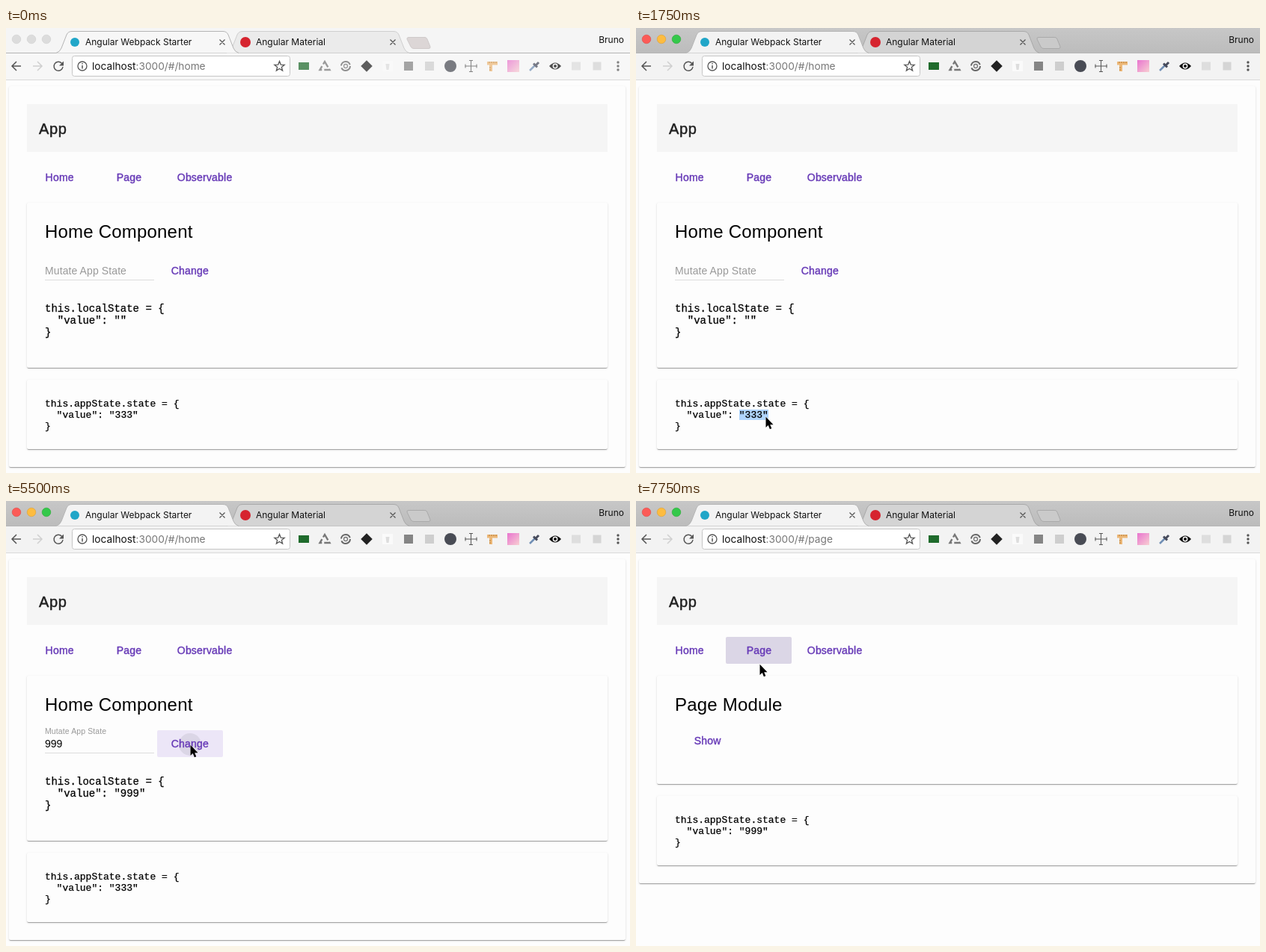
An HTML page for the animation above (8 s loop, 834 by 596 pixels).

```html
<!DOCTYPE html>
<html lang="en">
<head>
<meta charset="utf-8">
<title>App state demo</title>
<style>
  html, body { margin: 0; width: 100%; height: 100%; overflow: hidden; background: #fdfdfd; }
  .card { position: absolute; background: #fdfdfd; border-radius: 2px;
    box-shadow: 0 2px 1px -1px rgba(0,0,0,.2), 0 1px 1px rgba(0,0,0,.14), 0 1px 3px rgba(0,0,0,.12); }
  .inner { left: 28px; width: 776px; }
  svg { position: absolute; left: 0; top: 0; }
  text { white-space: pre; font-family: "Liberation Sans", Arial, sans-serif; }
  .ui { font: 12px Inter, sans-serif; fill: #111; }
  .url { font: 13.7px Inter, sans-serif; fill: #777; }
  .title { font-size: 24px; letter-spacing: .2px; }
  .app { font-size: 20px; letter-spacing: .7px; fill: #212121; stroke: #212121; stroke-width: .5; }
  .btn { font-size: 14px; letter-spacing: .2px; fill: #673ab7; stroke: #673ab7; stroke-width: .4; }
  .code { font-family: "Liberation Mono", "Courier New", monospace; stroke: #000; stroke-width: .25; }
  .line { fill: none; stroke: #555; stroke-width: 1.5; }
  #strip { fill: url(#bar); }
  #tools { fill: #f3f3f3; }
  #tab2 { fill: #d4d4d4; stroke: #a9a9a9; }
  #plus { fill: #cacaca; stroke: #aaa; }
  .idle #strip { fill: #f5f5f5; }
  .idle #tools { fill: #f7f7f7; }
  .idle #tab2 { fill: #ebebeb; stroke: #cfcfcf; }
  .idle #plus { fill: #dcd6d6; stroke: #cfcaca; }
  .idle #lights circle { fill: #dcdcdc; stroke: #cfcfcf; }
  .idle #icons { opacity: .72; }
</style>
</head>
<body>
<div class="card" id="outer" style="left:4px;top:78px;width:824px"></div>
<div class="card inner" id="main" style="top:234px"></div>
<div class="card inner" id="state" style="height:93px"></div>

<svg id="stage" width="834" height="596" viewBox="0 0 834 596">
  <defs>
    <linearGradient id="bar" x2="0" y2="1"><stop stop-color="#c7c7c7"/><stop offset="1" stop-color="#bcbcbc"/></linearGradient>
    <linearGradient id="pink" x2="1" y2="1"><stop stop-color="#e874cf"/><stop offset="1" stop-color="#f8cfd2"/></linearGradient>
    <path id="tab" d="M67 33.5Q72 32 74 27L81 9Q83 4.500 88 4.500H290Q295 4.500 297 9L304 27Q306 32 311 33.500"/>
    <clipPath id="btnBox"><rect width="88" height="36" rx="2"/></clipPath>
  </defs>

  <rect id="strip" width="834" height="33"/>
  <path d="M0 33.500H834" stroke="#b5b5b5"/>
  <g id="lights" stroke-width=".6">
    <circle cx="14" cy="15" r="5.800" fill="#fc5b57" stroke="#df4744"/>
    <circle cx="34" cy="15" r="5.800" fill="#fdbc40" stroke="#dea033"/>
    <circle cx="54" cy="15" r="5.800" fill="#34c84a" stroke="#27aa35"/>
  </g>
  <use href="#tab" x="228" id="tab2"/>
  <path id="plus" d="M538 12.500H560Q562 12.500 563 15L567 25Q567.500 27.500 565 27.500H545Q542 27.500 541 25L536 15Q535.500 12.500 538 12.500Z"/>
  <g id="tools">
    <rect y="34" width="834" height="36"/>
    <use href="#tab" stroke="#b5b5b5"/>
  </g>
  <path d="M0 69.500H834" stroke="#d9d9d9"/>
  <circle cx="92" cy="19" r="6" fill="#21a6c8"/>
  <circle cx="320" cy="19" r="7" fill="#d6242f"/>
  <path d="M285.500 15.500l7 7m0-7l-7 7M513.500 15.500l7 7m0-7l-7 7" stroke="#555" stroke-width="1.300"/>
  <text class="ui" x="106" y="23">Angular Webpack Starter</text>
  <text class="ui" x="334" y="23">Angular Material</text>
  <text class="ui" x="826" y="20" text-anchor="end">Bruno</text>

  <path class="line" d="M20 51H8.500M14 45l-6 6l6 6"/>
  <path class="line" d="M36 51h11.500M42 45l6 6l-6 6" style="stroke:#d0d0d0"/>
  <path class="line" d="M74.500 47.200A6 6 0 1 0 76 52"/>
  <path d="M77 44.500v6h-6z" fill="#555"/>
  <rect x="88.500" y="37.500" width="291" height="27" rx="3" fill="#fff" stroke="#c6c6c6"/>
  <circle class="line" cx="102" cy="51" r="6" style="stroke-width:1.300"/>
  <path d="M102 50v4.500M102 47v1.600" stroke="#555" stroke-width="1.500"/>
  <text class="url" x="115" y="56"><tspan fill="#111">localhost</tspan>:3000/#/<tspan id="route"></tspan></text>
  <path id="star" class="line" style="stroke-width:1.300"/>

  <g id="icons">
    <rect x="391" y="46" width="14" height="10" fill="#1f6b2c"/>
    <path class="line" stroke-dasharray="8.500 3" d="M426 45l6.500 11h-13z" style="stroke:#777;stroke-width:2.400"/>
    <circle class="line" cx="454" cy="51" r="6" stroke-dasharray="16 2.850" style="stroke:#666;stroke-width:2"/>
    <circle cx="454" cy="51" r="2.500" fill="none" stroke="#777" stroke-width="1.300"/>
    <rect x="476.500" y="45.500" width="11" height="11" fill="#222" transform="rotate(45 482 51)"/>
    <rect x="503" y="44" width="14" height="14" fill="#fafafa"/>
    <path d="M507.500 48h5l-1 8h-3z" fill="#ddd"/>
    <rect x="532" y="45" width="12" height="12" fill="#858585"/>
    <rect x="560" y="45" width="12" height="12" fill="#cecece"/>
    <circle cx="594" cy="51" r="8" fill="#494c55"/>
    <path d="M621.500 43v16M613.500 51h16M619 43.500h5M619 58.500h5M614 48.500v5M629 48.500v5" stroke="#555" fill="none"/>
    <path d="M643 45h14v4.500h-7v8.500h-4v-8.500h-3z" fill="#ecb878"/>
    <path d="M646 45v2M649 45v2M652 45v2M655 45v2M646 53h2M646 56h2" stroke="#b67a35"/>
    <rect x="670" y="43" width="16" height="16" fill="url(#pink)"/>
    <path d="M700 57l7-7" stroke="#7290b5" stroke-width="2.500"/>
    <path d="M705 47.500l5 5M708 50l4-4" stroke="#474b5c" stroke-width="3"/>
    <path d="M726 51Q734 42 742 51Q734 60 726 51Z" fill="#111"/>
    <circle cx="734" cy="51" r="3.400" fill="#fff"/><circle cx="734" cy="51" r="2" fill="#111"/>
    <rect x="756" y="45.500" width="12" height="11" fill="#dedede"/>
    <rect x="784.500" y="45.500" width="11" height="11" fill="#d5d5d5"/>
    <g fill="#555"><circle cx="818" cy="46" r="1.700"/><circle cx="818" cy="51" r="1.700"/><circle cx="818" cy="56" r="1.700"/></g>
  </g>

  <rect x="28" y="102" width="776" height="64" fill="#f5f5f5"/>
  <text class="app" x="44" y="142">App</text>
  <g id="pageHover" transform="translate(120 182)" clip-path="url(#btnBox)">
    <rect width="88" height="36" fill="#ece6f7"/>
    <circle id="pageRipple" cx="53" cy="31" fill-opacity=".07"/>
  </g>
  <text class="btn" x="52.600" y="205">Home</text>
  <text class="btn" x="147.700" y="205">Page</text>
  <text class="btn" x="228.800" y="205">Observable</text>

  <g id="home">
    <text class="title" x="52" y="281">Home Component</text>
    <path d="M52 337.500H198" stroke="#dcdcdc"/>
    <rect id="underline" y="337" height="2" fill="#673ab7"/>
    <text id="label" x="52" letter-spacing=".1">Mutate App State</text>
    <text id="field" x="52" y="330" font-size="14"></text>
    <rect id="caret" y="318" width="1" height="15"/>
    <g id="changeHover" transform="translate(202 307)" clip-path="url(#btnBox)">
      <rect width="88" height="36" fill="#ece6f7"/>
      <circle id="changeRipple" cx="44" cy="19" fill-opacity=".07"/>
    </g>
    <text class="btn" x="220.800" y="330">Change</text>
    <g font-size="14">
      <text class="code" x="52" y="380">this.localState = {</text>
      <text class="code" x="52" y="396" id="local"></text>
      <text class="code" x="52" y="412">}</text>
    </g>
  </g>
  <g id="page">
    <text class="title" x="52" y="281">Page Module</text>
    <text class="btn" x="77.800" y="326">Show</text>
  </g>
  <g id="dump" font-size="13">
    <rect id="mark" x="138" y="511" height="14" fill="#b0d5fd"/>
    <text class="code" x="52" y="507">this.appState.state = {</text>
    <text class="code" x="52" y="522" id="shared"></text>
    <text class="code" x="52" y="537">}</text>
  </g>
  <path id="cursor" d="M.5 .8V15L3.700 12L5.900 17.200L8.300 16.200L6.200 11.200H10.500Z" stroke="#fff" paint-order="stroke"/>
</svg>

<script>
const LOOP = 8000, TICK = 250;
const BLUR = 5500, SUBMIT = 5750, ROUTE = 7500;
const $ = id => document.getElementById(id);
const set = (id, attrs) => { for (const k in attrs) $(id).setAttribute(k, attrs[k]); };
const show = (id, on) => $(id).style.display = on ? '' : 'none';
const put = (id, s) => { if ($(id).textContent !== s) $(id).textContent = s; };
const between = (t, a, b) => t >= a && t < b;

// pointer path: time, x, y
const path = [
  [250, 118, 524], [750, 118, 524], [1000, 122, 520],
  [1250, 137, 520], [1750, 173, 520], [2250, 173, 520], [2500, 149, 339],
  [2750, 83, 321], [3250, 85, 318], [4750, 85, 318],
  [5000, 180, 322], [5250, 246, 325], [5500, 246, 326],
  [5750, 154, 522], [6250, 151, 520], [6500, 152, 523],
  [6750, 172, 193], [7250, 168, 214], [7750, 165, 218]
];

function pointer(t) {
  const i = path.findIndex(p => p[0] >= t);
  if (i < 1) return path[Math.max(i, 0)].slice(1);
  const [a, b] = [path[i - 1], path[i]], k = (t - a[0]) / (b[0] - a[0]);
  return [a[1] + (b[1] - a[1]) * k, a[2] + (b[2] - a[2]) * k];
}

// hover fill plus a ripple that spreads from the press
function button(name, t, enter, press, leave) {
  show(name + 'Hover', between(t, enter, leave));
  set(name + 'Ripple', { r: t < press ? 0 : 15 + (t - press) * .2 });
}

function render(now) {
  const t = Math.floor(now % LOOP / TICK) * TICK;
  const onPage = t >= ROUTE, lift = onPage ? 76 : 0;

  $('stage').classList.toggle('idle', t < 250);
  put('route', onPage ? 'page' : 'home');
  show('home', !onPage);
  show('page', onPage);
  $('outer').style.height = 510 - lift + 'px';
  $('main').style.height = 221 - lift + 'px';
  $('state').style.top = 471 - lift + 'px';
  set('dump', { transform: `translate(0 ${-lift})` });

  const focused = between(t, 3500, BLUR);
  const float = between(t, 3500, SUBMIT) ? (t === 3500 ? .7 : 1) : 0;
  const count = Math.min(3, Math.max(0, (t - 4000) / TICK));
  const typed = t < SUBMIT ? '9'.repeat(count) : '';
  set('label', {
    y: 330 - 18 * float, 'font-size': 14 - 3.5 * float,
    fill: focused ? '#673ab7' : '#999'
  });
  set('underline', { x: 125 - 73 * float, width: focused ? 146 * float : 0 });
  put('field', typed);
  set('caret', { x: 52 + 7.79 * typed.length });
  show('caret', focused && t !== 4000);
  put('local', `  "value": "${typed}"`);
  put('shared', `  "value": "${t < SUBMIT ? '333' : '999'}"`);

  const marked = between(t, 1500, 3500) ? (t === 1500 ? 19.5 : 39) : 0;
  set('mark', { width: marked });

  button('change', t, 5250, 5500, 5750);
  button('page', t, 7000, 7250, LOOP);

  show('cursor', t >= 250);
  set('cursor', { transform: `translate(${pointer(t)})` });
}

const points = Array.from({ length: 10 }, (_, i) => {
  const r = i % 2 ? 3 : 7, a = (i / 5 - .5) * Math.PI;
  return [365.5 + r * Math.cos(a), 51.5 + r * Math.sin(a)];
});
set('star', { d: 'M' + points.join('L') + 'Z' });

let start;
function loop(now) {
  start ??= now;
  render(now - start);
  requestAnimationFrame(loop);
}
render(0);
requestAnimationFrame(loop);
</script>
</body>
</html>
```
